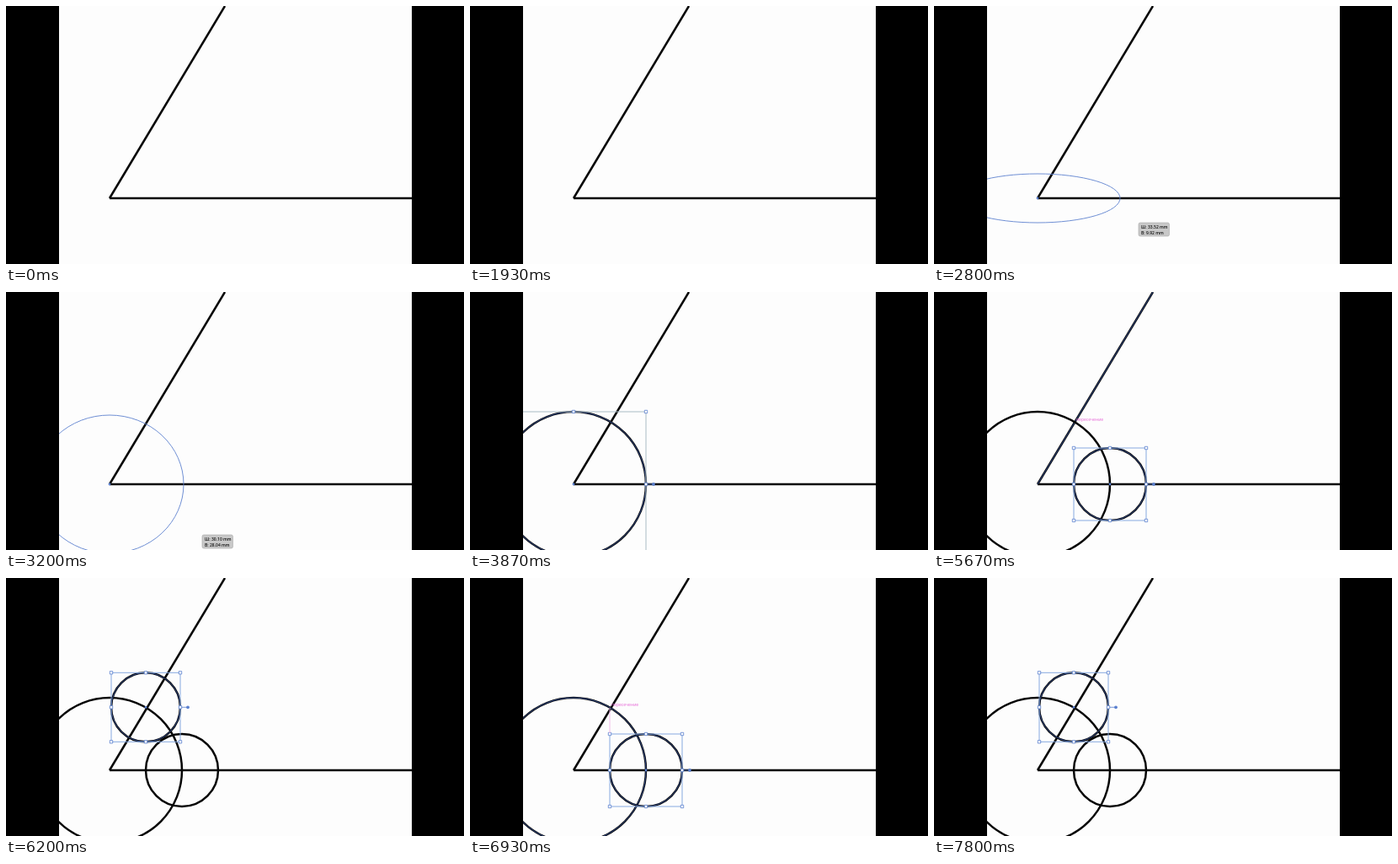
These frames come from a looping animation (544 px wide and 306 px high, 8 s). An HTML page with a canvas:

```html
<!DOCTYPE html>
<html lang="ru">
<head>
<meta charset="utf-8">
<title>Построение угла</title>
<style>
  html, body { margin: 0; width: 100%; height: 100%; overflow: hidden; background: #000; }
  canvas { display: block; width: 544px; height: 306px; }
</style>
</head>
<body>
<canvas></canvas>
<script>
const W = 544, H = 306, LOOP = 8000, STEP = 1000 / 15;
const PAGE = { left: 63, right: 482 };
const BLUE = '#5b80cf', INK = '#050505', PINK = '#e76fd8';

const apex = { x: 123, y: 228 };
const diagonal = [apex, { x: 260, y: 0 }];
const base = [apex, { x: 490, y: 228 }];
const big = { ...apex, r: 86 };
const right = { x: 209, y: 228, r: 43 };
const upper = { x: 166, y: 153.3, r: 41 };

// Drag paths: time, horizontal radius, vertical radius
const bigDrag = [[2460, 6, 2], [2600, 48, 10], [2800, 98, 29], [2930, 98, 48], [3130, 89, 80], [3200, 88, 82], [3460, 86, 86]];
const rightDrag = [[4860, 6, 5], [5000, 30, 26], [5130, 43, 43]];
const upperDrag = [[5800, 5, 4], [6000, 30, 28], [6130, 41, 41]];
const upperRedraw = [[7260, 5, 4], [7460, 26, 32], [7660, 41, 41]];

const canvas = document.querySelector('canvas');
const ctx = canvas.getContext('2d');
const scale = window.devicePixelRatio || 1;
canvas.width = W * scale;
canvas.height = H * scale;

function radiiAt(path, t) {
  const i = path.findIndex(key => key[0] > t);
  if (i < 0) return path[path.length - 1].slice(1);
  if (i === 0) return path[0].slice(1);
  const [a, b] = [path[i - 1], path[i]];
  const k = (t - a[0]) / (b[0] - a[0]);
  return [1, 2].map(n => a[n] + (b[n] - a[n]) * k);
}

function stroke(color, width) {
  ctx.strokeStyle = color;
  ctx.lineWidth = width;
  ctx.stroke();
}

function inkPath(active) {
  stroke(INK, 2.5);
  if (active) stroke('rgba(72, 108, 200, .65)', 1);
}

function line([a, b], active) {
  ctx.beginPath();
  ctx.moveTo(a.x, a.y);
  ctx.lineTo(b.x, b.y);
  inkPath(active);
}

function circle({ x, y, r }, active) {
  ctx.beginPath();
  ctx.arc(x, y, r, 0, Math.PI * 2);
  inkPath(active);
}

function dot(x, y, r = 1.4) {
  ctx.beginPath();
  ctx.arc(x, y, r, 0, Math.PI * 2);
  ctx.fillStyle = BLUE;
  ctx.fill();
}

function handle(x, y) {
  ctx.beginPath();
  ctx.rect(x - 1.7, y - 1.7, 3.4, 3.4);
  ctx.fillStyle = '#fff';
  ctx.fill();
  stroke(BLUE, 0.8);
}

function selection({ x, y, r }, frame = '#86a9e0') {
  ctx.beginPath();
  ctx.rect(x - r, y - r, r * 2, r * 2);
  stroke(frame, 1);
  ctx.beginPath();
  ctx.moveTo(x + r, y);
  ctx.lineTo(x + r + 9, y);
  stroke(BLUE, 0.8);
  dot(x + r + 9, y, 1.9);
  for (const i of [-1, 0, 1])
    for (const j of [-1, 0, 1])
      if (i || j) handle(x + i * r, y + j * r);
  dot(x, y);
}

function label(text, x, y) {
  ctx.font = '5px "Noto Sans", sans-serif';
  ctx.fillStyle = PINK;
  ctx.fillText(text, x, y);
}

function tooltip(x, y, rx, ry) {
  const size = r => (r * 2 * 0.171).toFixed(2) + ' mm';
  y = Math.min(y, 288);
  ctx.beginPath();
  ctx.roundRect(x, y, 36.5, 16, 2);
  ctx.fillStyle = '#c8c8c8';
  ctx.fill();
  stroke('#aaa', 0.6);
  ctx.font = '600 5px "Open Sans", sans-serif';
  ctx.fillStyle = '#111';
  ctx.fillText('Ш: ' + size(rx), x + 3, y + 6.8);
  ctx.fillText('В: ' + size(ry), x + 3, y + 13.6);
}

function drag({ x, y }, path, t) {
  const [rx, ry] = radiiAt(path, t);
  ctx.beginPath();
  ctx.ellipse(x, y, rx, ry, 0, 0, Math.PI * 2);
  stroke('#5f83d0', 0.9);
  dot(x, y);
  tooltip(x + rx + 22, y + ry, rx, ry);
}

function draw(time) {
  // A small allowance keeps each pose on its 15 Hz step.
  const t = Math.floor((time + 4) / STEP) * STEP;
  const during = (from, to) => t >= from - 8 && t < to - 8;

  ctx.setTransform(scale, 0, 0, scale, 0, 0);
  ctx.fillStyle = '#000';
  ctx.fillRect(0, 0, W, H);
  ctx.save();
  ctx.beginPath();
  ctx.rect(PAGE.left, 0, PAGE.right - PAGE.left, H);
  ctx.clip();
  ctx.fillStyle = '#fdfdfd';
  ctx.fillRect(0, 0, W, H);

  const bigSelected = during(3670, 4870);
  const rightSelected = during(5200, 5800) || during(6600, 7270);
  const upperSelected = during(6200, 6600) || during(7730, LOOP);

  line(base, during(200, 400));
  line(diagonal, during(470, 1930) || during(5600, 5800));
  if (t >= 3660) circle(big, bigSelected || during(6800, 7270));
  if (t >= 5190) circle(right, rightSelected);
  if (upperSelected) circle(upper, true);

  if (bigSelected) selection(big, '#a9bbc4');
  if (rightSelected) selection(right);
  if (upperSelected) selection(upper);

  if (during(2330, 2470)) label('пересечение', 125, 226);
  if (during(4330, 4870)) label('пересечение', 211, 226);
  if (during(5600, 5800)) label('пересечение', 169, 153);
  if (during(6870, 7270)) {
    label('пересечение', 168, 151.5);
    ctx.beginPath();
    ctx.moveTo(166, 154);
    ctx.lineTo(166, 184);
    stroke('#efb4e6', 0.9);
  }

  if (during(2470, 3670)) drag(apex, bigDrag, t);
  if (during(4870, 5200)) drag(right, rightDrag, t);
  if (during(5800, 6200)) drag(upper, upperDrag, t);
  if (during(7270, 7730)) drag(upper, upperRedraw, t);
  ctx.restore();
}

const start = performance.now();
function tick() {
  draw((performance.now() - start) % LOOP);
  requestAnimationFrame(tick);
}
tick();
</script>
</body>
</html>
```
